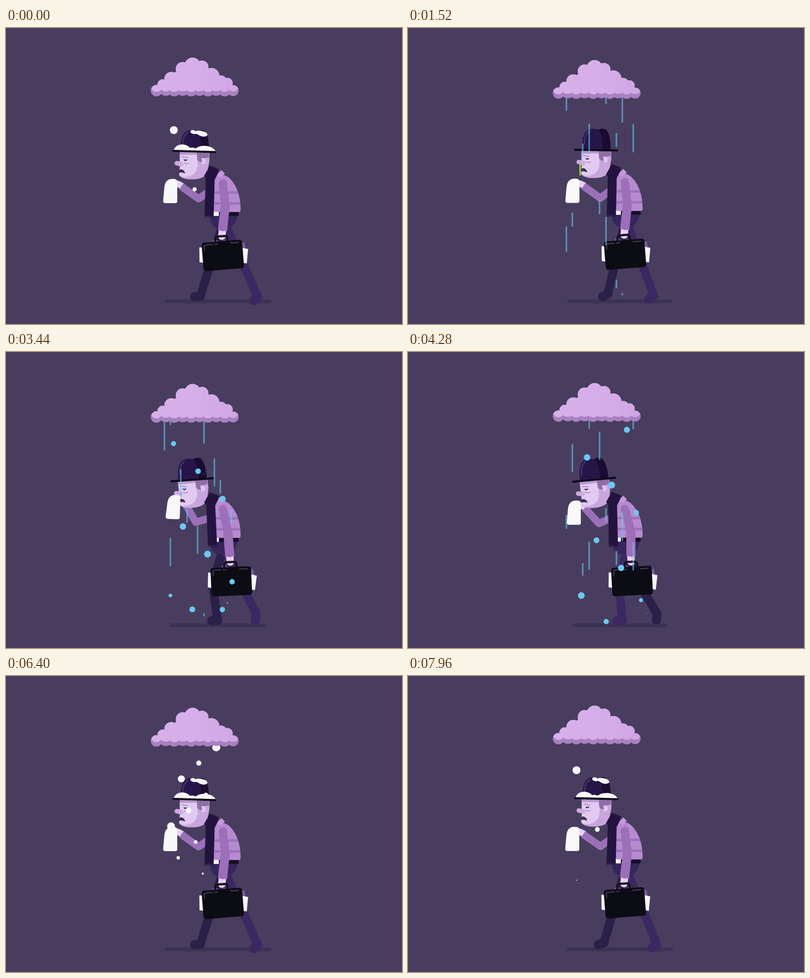
Recreate the animation shown at these times as an HTML page with a canvas. Size 800x600 px, loop 8000 ms.

```html
<!DOCTYPE html>
<html lang="en">
<head>
<meta charset="utf-8">
<title>Under the weather</title>
<style>
  html, body { margin: 0; width: 100%; height: 100%; overflow: hidden; background: #483d5f; }
  canvas { display: block; width: 800px; height: 600px; }
</style>
</head>
<body>
<canvas id="stage" width="800" height="600"></canvas>
<script>
const g = document.getElementById('stage').getContext('2d');
const LOOP = 8000, STEP = 40, TAU = Math.PI * 2, RAD = Math.PI / 180;
const SKY = 139, GROUND = 545, GOLD = 0.618;
const WHITE = '#f7f7f7', ICE = '#6cc8f2', SLEEVE = '#9b70b8', SKIN = '#e8d0f4', SCARF = '#23143f';
let flash = false;

const ink = c => flash ? WHITE : c;
const clamp = (v, a = 0, b = 1) => Math.max(a, Math.min(b, v));
const smooth = p => p * p * (3 - 2 * p);
const mod = (v, n) => ((v % n) + n) % n;
const spread = (i, ratio) => mod(i * ratio, 1);
const wave = (t, period) => (1 - Math.cos(TAU * t / period)) / 2;
const ramp = (t, a, b) => smooth(clamp((t - a) / (b - a)));

function fill(color, d) {
  g.fillStyle = ink(color);
  g.fill(d instanceof Path2D ? d : new Path2D(d));
}
function trace(color, w, d, cap = 'round') {
  g.strokeStyle = ink(color);
  g.lineWidth = w;
  g.lineCap = cap;
  g.lineJoin = 'round';
  g.stroke(new Path2D(d));
}
const poly = (...pts) => 'M' + pts.map(p => p.join(' ')).join('L');
function oval(color, x, y, r) {
  g.fillStyle = ink(color);
  g.beginPath();
  g.arc(x, y, r, 0, TAU);
  g.fill();
}
function box(color, x, y, w, h, r = 0) {
  g.fillStyle = ink(color);
  g.beginPath();
  g.roundRect(x, y, w, h, r);
  g.fill();
}
function group(x, y, deg, draw) {
  g.save();
  g.translate(x, y);
  g.rotate(deg * RAD);
  draw();
  g.restore();
}
function spin(x, y, deg) {
  const c = Math.cos(deg * RAD), s = Math.sin(deg * RAD);
  return [x * c - y * s, x * s + y * c];
}

// ---- cloud
const cloud = new Path2D('M304 118L334 96L357 78H397L420 96L459 120V130H304Z');
function puff(x, y, rx, ry = rx) {
  cloud.moveTo(x + rx, y);
  cloud.ellipse(x, y, rx, ry, 0, 0, TAU);
}
puff(304, 127, 11.5);
puff(317, 115, 11);
puff(334, 103, 14);
puff(357, 83, 14);
puff(377, 76, 16);
puff(396, 79, 13);
puff(415, 97, 16);
puff(434, 108, 12);
puff(447, 112, 11);
puff(459, 127, 11);
for (let i = 0; i < 8; i++) puff(323 + i * 17, 128, 12, 9.5 + i % 2);
const cloudTone = g.createLinearGradient(293, 0, 470, 0);
cloudTone.addColorStop(0, '#d6b0e9');
cloudTone.addColorStop(0.5, '#d6aee9');
cloudTone.addColorStop(1, '#cfa6e4');

function drawCloud(t) {
  g.save();
  g.translate(0, 5 * wave(t, 1000));
  fill('#a981c1', cloud);
  g.clip(cloud);
  g.fillStyle = ink(cloudTone);
  g.fillRect(285, 55, 190, 62);
  g.translate(0, -9);
  g.fill(cloud);
  g.restore();
}

// ---- rain: each column repeats a long drop, then a short one
const RAIN = { from: 600, to: 4940, cycle: 1200, gap: 540, speed: 0.53 };
const columns = { 320: 274, 332: 717, 353: 453, 366: 1091, 387: 670, 400: 248, 421: 412, 433: 980, 455: 1093 };

function splash(x, y, p, size = 1) {
  g.globalAlpha = 0.62 * clamp((1 - p) * 2);
  for (const deg of [-152, -115, -65, -28]) {
    const r = (4 + 9 * p) * size, a = spin(r, 0, deg), b = spin(r + 4 * size, 0, deg);
    trace(ICE, 3 * size, poly([x + a[0], y + a[1]], [x + b[0], y + b[1]]));
  }
  g.globalAlpha = 1;
}
function drawDrop(x, len, age) {
  const y = SKY + age * RAIN.speed;
  if (y > GROUND) {
    const p = (y - GROUND) / 230;
    if (p < 1) splash(x, 556, p);
    return;
  }
  g.globalAlpha = 0.62;
  trace(ICE, 3, `M${x} ${Math.max(130, y - len * clamp((562 - y) / 120))}V${y}`, 'butt');
  g.globalAlpha = 1;
}
function drawRain(t) {
  if (t > RAIN.to) return;
  for (const x in columns) {
    const long = mod(t + columns[x], RAIN.cycle), short = mod(long - RAIN.gap, RAIN.cycle);
    if (t - long > RAIN.from) drawDrop(x, 57, long);
    if (t - short > RAIN.from) drawDrop(x, 28, short);
  }
}

// ---- hail and snow
const hail = [], snow = [];
for (let b = 1930; b < 4350; b += 80 + 200 * clamp((2600 - b) / 600)) hail.push(b);
for (let b = 7830; b > 4760; b -= 80 + 220 * clamp((b - 6400) / 1400)) snow.push(b);

function heptagon(x, y, r, turn) {
  const pts = [];
  for (let a = 0; a < 359; a += 360 / 7) {
    const [dx, dy] = spin(r, 0, a + turn);
    pts.push([x + dx, y + dy]);
  }
  g.fillStyle = ICE;
  g.fill(new Path2D(poly(...pts) + 'Z'));
}
function drawHail(t) {
  hail.forEach((born, i) => {
    const age = t - born;
    if (age < 0) return;
    let x = 334 + 130 * spread(i, GOLD), y = SKY + age * 0.7, r = 5.5 + 2 * spread(i, 0.77);
    if (y > 548) {
      const p = (y - 548) / 190;
      if (p >= 1) return;
      x += (x > 390 ? 70 : -30) * p;
      y = 548 - 55 * Math.sin(Math.PI * p);
      r *= 1 - p;
    }
    heptagon(x, y, r, age * 0.2);
  });
}
function drawSnow(t) {
  snow.forEach((born, i) => {
    const age = mod(t - born, LOOP), y = SKY + age * 0.4;
    if (y > 430) return;
    const x = 345 + 85 * spread(i, GOLD) - age * 0.035;
    oval(WHITE, x, y, (4 + 5 * spread(i + 2.1, 0.382)) * clamp((430 - y) / 120));
  });
}

// ---- figure
function leg(color, s, hx, hy) {
  const back = s / 800, q = clamp(back - 1);
  let x = 393 + 115 * back, y = 543, toe = 4 + 46 * back ** 6;
  if (q > 0) {
    x = 508 - 115 * smooth(q * q);
    y = 542 - 13 * Math.sin(Math.PI * q);
    toe = 50 - 45 * q + 55 * Math.sin(Math.PI * q);
  }
  const dx = x - hx, dy = y - hy, d = Math.hypot(dx, dy);
  const bend = Math.sqrt(Math.max(0, 73 * 73 - d * d / 4));
  const knee = [hx + dx / 2 - dy / d * bend, hy + dy / 2 + dx / d * bend];
  const tip = spin(-12, 0, -toe);
  trace(color, 17.5, poly([hx, hy], knee, [x, y]));
  trace(color, 18.5, poly([x, y + 1], [x + tip[0], y + 1 + tip[1]]));
}

function head(t, open, snowy) {
  // face
  fill('#c9a5de', 'M351 248V283L350 299Q357 307 374 307Q400 307 406 294L411 270V248Z');
  fill('#e1caf1', 'M351 248V283L350 298Q354 303 362 302Q387 300 387 276V248Z');
  fill('#bb97d1', 'M351 250H387V257H351Z');
  fill('#8f6fa6', 'M386 250H410V263H403V272H394Q385 271 386 262Z');
  fill('#e0c3f0', 'M395 264Q404 262 404 270Q404 277 396 276Z');
  trace('#d2a9e2', 9, 'M345 274L354 276');
  trace('#b48fcc', 2, 'M356 261L367 263');
  trace('#261842', 2, 'M360 267Q363 270 365 267');
  trace('#b892d0', 1.8, 'M360 273Q364 277 369 274');
  if (open > 0.35) {
    oval('#33264c', 365, 290, 9 * open);
    fill('#33264c', 'M350 283L364 281V298L354 298Z');
  } else fill('#3c2c53', 'M349 289Q352 285 356 287Q361 289 362 295Q356 292 350 293Z');

  // hat
  fill('#271549', 'M352 249C353 222 357 208 373 207Q381 207 386 209Q394 205 401 209Q410 217 410 250Z');
  fill('#190b31', 'M386 209Q394 205 401 209Q410 217 410 250H393Q396 220 386 209Z');
  trace('#493867', 2.5, 'M357 238Q357 217 368 212');
  if (snowy > 0) {
    g.save();
    g.translate(0, 250 * (1 - snowy));
    g.scale(1, snowy);
    fill(WHITE, 'M338 249Q342 236 357 236Q367 237 372 243Q377 241 383 244Q392 238 404 239Q420 241 424 251Z');
    g.restore();
    g.globalAlpha = snowy;
    fill(WHITE, 'M372 210Q375 204 383 209Q389 207 396 209Q407 211 407 217Q402 223 391 218Q385 213 380 215Q373 214 372 210Z');
    g.globalAlpha = 1;
  }
  trace('#0e0a1b', 4.2, 'M338 249L423 251.5');

  // drops bursting on the hat
  const p = t % 400 / 280;
  if (t > 800 && t < RAIN.to && p < 1) splash(375 + 40 * spread(Math.floor(t / 400), GOLD), 246, p, 0.75);
}

function briefcase() {
  fill('#7b5ca6', 'M-23 -23L-15 -35L-4 -28ZM38 -24L46 -22L47 -5H38Z');
  fill('#f7f5f9', 'M-46 -20L-36 -19V13L-48 10Z');
  fill('#f7f5f9', 'M38 -13L52 -9L47 20L38 18Z');
  trace('#17131f', 4.5, 'M-13 -28V-34Q-12 -39 -6 -39H6Q12 -39 12 -34V-28');
  box('#0c0d14', -41, -29, 82, 58, 5);
  trace('#43395c', 2.2, 'M-36 -13V-21Q-36 -24 -32 -24H-20M-15 -24H-9M18 -24H34');
}

function torso() {
  box('#150e29', 420, 373, 50, 8, 2);
  box(WHITE, 419, 370, 11, 11);
  const shirt = new Path2D('M412 306L428 297Q441 296 450 303Q474 325 474 369Q474 373 470 373H421Z');
  fill('#b68ad0', shirt);
  g.save();
  g.clip(shirt);
  box('#9d72ba', 410, 331, 66, 5);
  box('#9d72ba', 410, 353, 66, 5);
  g.restore();
  fill('#c598d9', 'M424 298L435 288L442 295L434 303Z');
}

function drawMan(t) {
  const bounce = Math.sin(TAU * t / 800), u = wave(t, 800), swing = 20 * wave(t, 1600);
  const lean = ramp(t, 1640, 2100) - 1.5 * ramp(t, 2480, 2660) + 0.5 * ramp(t, 2700, 3080);
  const wipe = ramp(t, 2850, 3100) - ramp(t, 3500, 3900);
  const b = 4 * bounce, by = b + 5 * lean, tilt = 14 * lean;

  const neck = spin(-31, -90, tilt);
  const nx = 443 + neck[0] - 3 * lean, ny = 380 + neck[1] + 5.5 * bounce + 9 * lean;
  const turn = -9 * u + 48 * lean;

  const shoulder = [438 + 27 * lean, 315 + by];
  const elbow = [443 + swing * 0.5 + 35 * lean + 3 * wipe, 360 + by];
  const hand = [436 + swing + 28 * lean + 13 * wipe, 422 + b - 2 * lean];
  const toward = k => elbow.map((v, i) => v + (hand[i] - v) * k);
  const farHand = [347 + 4 * u + 22 * lean + 4 * wipe, 316 - 6 * u - 12 * lean - 12 * wipe];
  const farElbow = [389 - 4 * u + 19 * lean - 3 * wipe, 346 - 6 * lean - 3 * wipe + b * 0.5];

  // far arm
  trace(SKIN, 13, poly(farHand, [farHand[0] + 8, farHand[1] + 4]));
  trace(SLEEVE, 15, poly([farHand[0] + 7, farHand[1] + 5], farElbow, [nx - 2, ny + 42]), 'butt');

  // legs, hips and torso
  leg('#2a2049', t % 1600, 438, 397 + by);
  leg('#3b2862', (t + 800) % 1600, 442, 396 + by);
  group(0, by, 0, () => fill('#36265d', 'M413 379Q410 400 427 406H451Q465 399 468 379Z'));
  group(443, 380 + by, tilt, () => {
    g.translate(-443, -380);
    torso();
  });

  // head and scarf
  const snowy = t < 4000 ? 1 - ramp(t, 200, 1000) : ramp(t, 5250, 6200);
  group(nx, ny, turn, () => {
    g.translate(-412, -290);
    head(t, lean, snowy);
  });
  const bx = 401 + 6 * u + 29 * lean + 3 * wipe, end = 381 + b + 10 * u;
  fill(SCARF, poly([nx - 8, ny + 2], [nx + 10, ny + 2], [bx + 18.5, end], [bx, end]) + 'Z');
  for (let i = 0; i < 6; i++) trace(SCARF, 1.6, `M${bx + 1 + i * 3.3} ${end - 1}v4.5`, 'butt');
  fill(SCARF, `M${nx} ${ny - 11}l18 7l-1 7l-7 14l-15 -1l-7 -6Z`);

  // runny nose
  if (t > 900 && t < 2700) {
    const [dx, dy] = spin(-64, -13, turn), fling = ramp(t, 2500, 2660);
    const drip = spin(Math.min(46, (t - 900) * 0.037) + 20 * fling, 0, 90 + 85 * fling);
    trace('#8fe02c', 3, `M${nx + dx} ${ny + dy}l${drip[0]} ${drip[1]}`);
  }

  // near arm with the briefcase
  trace(SKIN, 15, poly(toward(0.82), hand));
  group(hand[0] + 2, hand[1] + 39, -4.5 + 0.1 * swing + 1.5 * lean + 1.5 * wipe, briefcase);
  trace(SLEEVE, 17, poly(shoulder, elbow, toward(0.7)));
  trace(SLEEVE, 18.5, poly(elbow, toward(0.82)), 'butt');

  // handkerchief
  group(farHand[0] - 1, farHand[1] - 10, 2 * lean + 2 * wipe, () =>
    fill('#f8f8f8', 'M-12 0Q-2 -1 0 4V45Q0 49 -4 49H-25Q-29 48 -28.5 44L-26 16Q-24 1 -12 0Z'));
}

function draw(t) {
  flash = false;
  box('#483d5f', 0, 0, 800, 600);
  const w = 216 - 30 * wave(t, 800);
  box('#3c3253', 428 - w / 2, 550, w, 8, 4);
  flash = t >= 4960 && t < 5120;
  drawMan(t);
  drawRain(t);
  drawHail(t);
  drawSnow(t);
  if (flash) fill(WHITE, 'M374 134H387L385 165H394L381 218L383 175H372Z');
  drawCloud(t);
}

const start = performance.now();
function tick() {
  const t = (performance.now() - start) % LOOP;
  draw(Math.floor(t / STEP) * STEP);
  requestAnimationFrame(tick);
}
tick();
</script>
</body>
</html>
```
